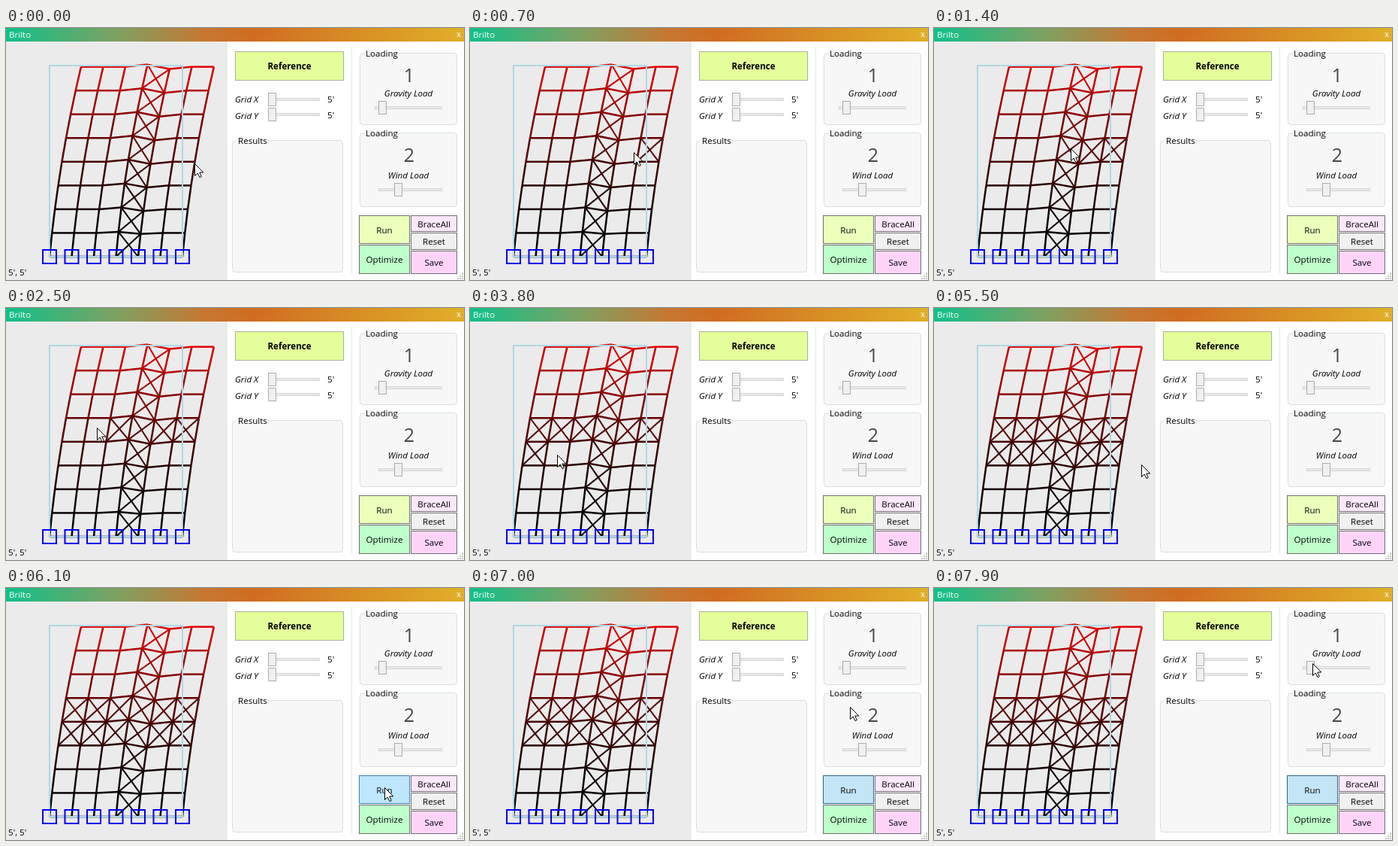
An HTML page that plays this animation: 610 by 335 pixels, repeating every 8 s.

```html
<!DOCTYPE html>
<html lang="en">
<head>
<meta charset="utf-8">
<title>Brilto</title>
<style>
html, body { margin: 0; width: 100%; height: 100%; overflow: hidden; background: #fff; }
svg { display: block; width: 610px; height: 335px; font: 11.6px "Open Sans", "Noto Sans", sans-serif; fill: #000; }
.mid { text-anchor: middle; }
.it { font-style: italic; }
.bold { font-weight: 700; }
.num { font-size: 25px; fill: #4a4444; }
.group { fill: #f7f7f7; stroke: #d5dfe5; }
.button { stroke: #707070; }
.soft { stroke: #abae9c; }
.track { fill: #e7eaea; stroke: #d6d6d6; }
.thumb { fill: #f0f0f0; stroke: #acacac; }
.support { fill: none; stroke: #0000f0; stroke-width: 2; }
#truss { fill: none; stroke-width: 2.5; }
#run.hover { fill: #bee6fd; stroke: #3c7fb1; }
#run.pressed { fill: #c4e5f6; stroke: #2c628b; }
</style>
</head>
<body>
<svg viewBox="0 0 610 335">
  <defs>
    <linearGradient id="bar">
      <stop offset="0" stop-color="#10c08a"/>
      <stop offset=".24" stop-color="#7ca262"/>
      <stop offset=".44" stop-color="#c87630"/>
      <stop offset=".54" stop-color="#d06c20"/>
      <stop offset="1" stop-color="#e0b028"/>
    </linearGradient>
  </defs>
  <rect y="18" width="295" height="317" fill="#ebebeb"/>
  <rect width="610" height="18" fill="url(#bar)"/>
  <text x="4" y="13" fill="#fff">Brilto</text>
  <text x="603" y="12" class="mid" fill="#fff">x</text>
  <path d="M460.5 24V327" stroke="#e4eaed"/>

  <g id="truss"></g>
  <rect x="58" y="50" width="177" height="254" fill="none" stroke="#add8e6" stroke-width="2"/>
  <g id="supports"></g>
  <text x="3" y="329">5', 5'</text>

  <g id="panel"></g>
  <path d="M607 327h2M604 330h2M607 330h2M601 333h2M604 333h2M607 333h2" stroke="#c0c0c0" stroke-width="2"/>
  <path id="cursor" d="M.5 .5V16.5L4.2 13 7 18.6 9.3 17.6 6.8 12H11.8Z" fill="#fff" stroke="#000"/>
</svg>
<script>
const LOOP = 8000, STEP = 100;
const COLS = 6, ROWS = 8, BAY = 29.5, STOREY = 31.55, CORE = 3;
const HOVER = 6100, PRESS = 6200;
const $ = id => document.getElementById(id);

function add(parent, tag, attrs, text) {
  const el = document.createElementNS("http://www.w3.org/2000/svg", tag);
  for (const key in attrs) el.setAttribute(key, attrs[key]);
  if (text) el.textContent = text;
  parent.append(el);
  return el;
}

// The frame sways to the right; the braced core is pulled up on one side and pushed down on the other
const truss = $("truss");

function node(col, row) {
  const side = (col === CORE + 1) - (col === CORE);
  const sway = 3 * row + 0.28 * row * row;
  return [58 + col * BAY + sway, 304 - row * STOREY + side * 3 * Math.tanh(row / 2)];
}

function member(c1, r1, c2, r2, parent = truss) {
  const [x1, y1] = node(c1, r1), [x2, y2] = node(c2, r2);
  const red = Math.round(225 * ((r1 + r2) / 2 / ROWS) ** 1.7);
  add(parent, "line", { x1, y1, x2, y2, stroke: `rgb(${red},0,0)` });
}

function brace(col, row) {
  const g = add(truss, "g", { "stroke-width": 2 });
  member(col, row, col + 1, row + 1, g);
  member(col + 1, row, col, row + 1, g);
  return g;
}

for (let row = 0; row <= ROWS; row++) {
  if (row < ROWS) brace(CORE, row);
  for (let col = 0; col <= COLS; col++) {
    if (row < ROWS) member(col, row, col, row + 1);
    if (col < COLS) member(col, row, col + 1, row);
  }
}
for (let col = 0; col <= COLS; col++)
  add($("supports"), "rect", { x: 49 + col * BAY, y: 295, width: 18, height: 18, class: "support" });

// Bays are braced leftwards along one storey, then rightwards along the one below
const braces = [];
for (let col = 0; col < COLS; col++) {
  if (col === CORE) continue;
  braces.push({ el: brace(col, 4), at: 450 + 560 * (COLS - 1 - col) });
  braces.push({ el: brace(col, 3), at: 3480 + 330 * col });
}

// Controls
const panel = $("panel");
const label = (x, y, text, cls = "") => add(panel, "text", { x, y, class: cls }, text);
const box = (cls, x, y, w, h, more) =>
  add(panel, "rect", { class: cls, x: x + 0.5, y: y + 0.5, width: w - 1, height: h - 1, ...more });

function button(x, y, w, h, fill, text, cls = "button", textCls = "") {
  const el = box(cls, x, y, w, h, { fill });
  label(x + w / 2, y + h / 2 + 4.5, text, "mid " + textCls);
  return el;
}

function slider(x, y, w, thumb) {
  box("track", x, y - 2, w, 4);
  box("thumb", thumb, y - 9, 11, 18);
}

function group(x, y, w, h, title, gap) {
  box("group", x, y, w, h, { rx: 4 });
  add(panel, "rect", { x: x + 6, y: y - 1, width: gap, height: 3, fill: "#fbfbfb" });
  label(x + 8, y + 4.5, title);
}

function load(y, h, value, title, x, thumb) {
  group(471, y, 130, h, "Loading", 46);
  label(537, y + 39, value, "mid num");
  label(536, y + 58 + (y > 100 ? 3 : 0), title, "mid it");
  slider(x, y + (y > 100 ? 76 : 73), 581 - x, thumb);
}

button(305, 31, 145, 39, "#e4ff9a", "Reference", "soft", "bold");
["Grid X", "Grid Y"].forEach((text, i) => {
  label(305, 99 + i * 21.5, text, "it");
  slider(349, 95 + i * 20, 69, 349);
  label(428, 99 + i * 21, "5'");
});
group(301, 149, 148, 176, "Results", 42);
load(33, 96, "1", "Gravity Load", 491, 496);
load(139, 99, "2", "Wind Load", 496, 517);
const run = button(470, 249, 68, 38, "#ecffbb", "Run");
run.id = "run";
button(470, 288, 68, 39, "#bfffcb", "Optimize");
button(539, 249, 62, 22, "#fbe8fb", "BraceAll");
button(539, 272, 62, 23, "#f0f0f0", "Reset");
button(539, 296, 62, 31, "#ffd4f8", "Save");

// Pointer stops: time, x, y
const stops = [
  [0, 251, 180], [900, 209, 161], [2700, 110, 159], [3200, 82, 170], [3600, 97, 195],
  [4800, 211, 196], [5400, 238, 198], [6100, 504, 265], [7200, 506, 134], [7900, 504, 100], [LOOP, 504, 100]
];

function pointer(t) {
  const i = stops.findIndex(s => s[0] > t);
  const [t0, x0, y0] = stops[i - 1], [t1, x1, y1] = stops[i];
  const k = (t - t0) / (t1 - t0);
  return [x0 + (x1 - x0) * k, y0 + (y1 - y0) * k].map(Math.round);
}

function draw() {
  const t = Math.floor(performance.now() % LOOP / STEP) * STEP;
  for (const { el, at } of braces) el.setAttribute("visibility", t >= at ? "visible" : "hidden");
  run.setAttribute("class", "button" + (t >= PRESS ? " pressed" : t >= HOVER ? " hover" : ""));
  $("cursor").setAttribute("transform", `translate(${pointer(t)})`);
  requestAnimationFrame(draw);
}
draw();
</script>
</body>
</html>
```
